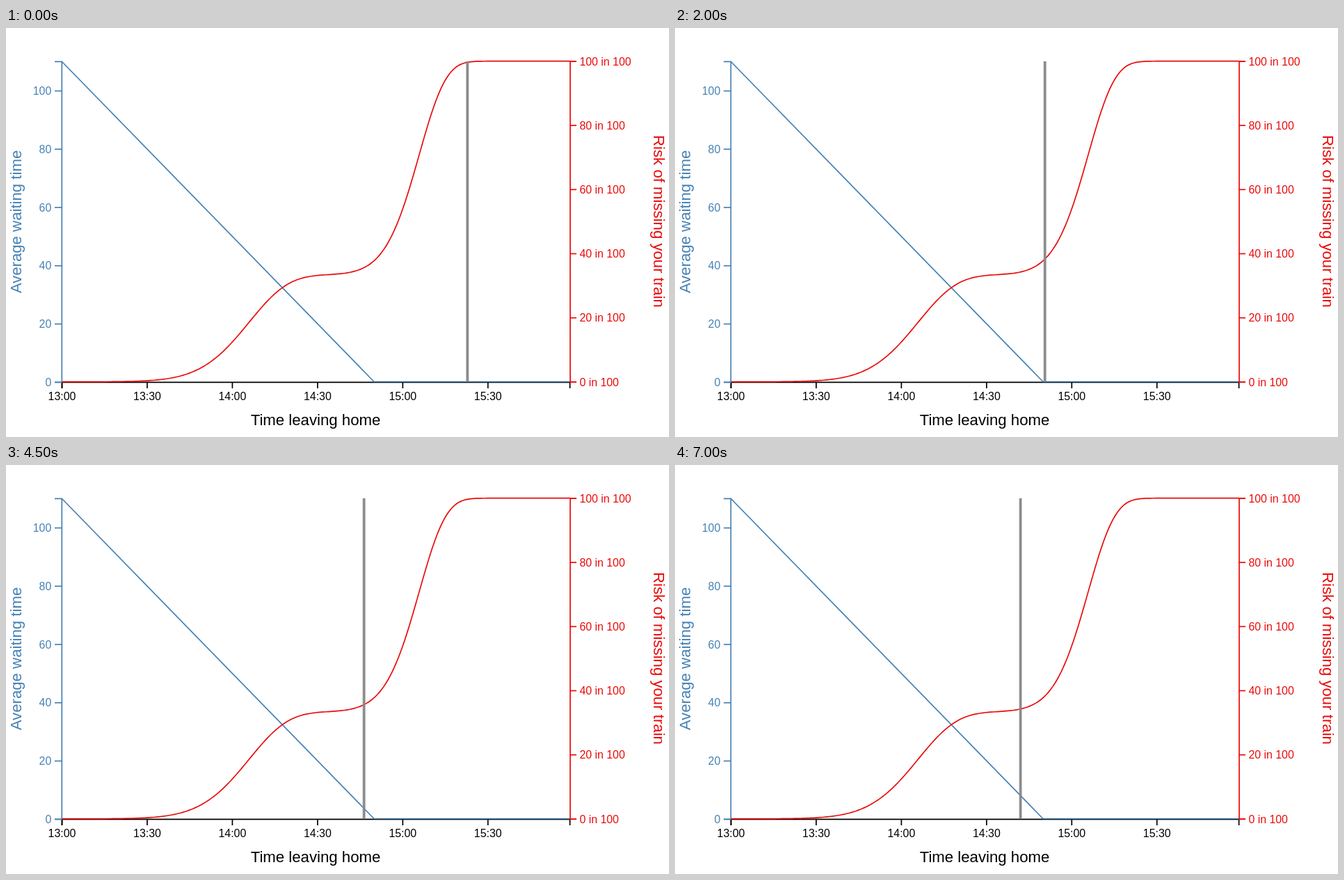
These frames come from a looping animation (953x588 px, 8 s). An HTML page:

```html
<!DOCTYPE html>
<html lang="en">
<head>
<meta charset="utf-8">
<title>Waiting time and risk</title>
<style>
  html, body { margin: 0; width: 100%; height: 100%; overflow: hidden; background: #fff; }
  svg { display: block; width: 953px; height: 588px; font: 15.9px "Liberation Sans", Arial, sans-serif; }
  path { fill: none; stroke-width: 1.7; }
  .title { font-size: 22.2px; text-anchor: middle; }
  .wait path { stroke: #4682b4; }
  .wait text { fill: #4682b4; }
  .wait .label { text-anchor: end; }
  .risk path { stroke: #ea0a0a; }
  .risk text { fill: #ea0a0a; }
  .time path { stroke: #000; }
  .time .label { text-anchor: middle; }
  #bar { fill: #868686; animation: drag 8s step-end infinite; }
  @keyframes drag {
    0% { transform: translateX(663.3px); }
    6.25% { transform: translateX(478px); }
    12.5% { transform: translateX(596.9px); }
    18.75% { transform: translateX(535px); }
    25% { transform: translateX(531.7px); }
    31.25% { transform: translateX(528.7px); }
    37.5% { transform: translateX(527px); }
    43.75% { transform: translateX(473px); }
    50% { transform: translateX(471px); }
    56.25% { transform: translateX(514.6px); }
    68.75% { transform: translateX(517.2px); }
    75% { transform: translateX(524px); }
    81.25% { transform: translateX(520px); }
    87.5%, 100% { transform: translateX(496.6px); }
  }
</style>
</head>
<body>
<svg viewBox="0 0 953 588">
  <g class="time" id="time">
    <path d="M80.5 518V509.3H810.6V518"/>
    <text class="title" x="445" y="571">Time leaving home</text>
  </g>
  <g class="wait" id="wait">
    <path d="M70 48.3H80.3V509.3H70"/>
    <path d="M80.5 48.5L529 508.5H810.6"/>
    <text class="title" transform="translate(22.3 278.5) rotate(-90)">Average waiting time</text>
  </g>
  <g class="risk" id="risk">
    <path d="M820 47.9H811V508.9H820"/>
    <path id="curve"/>
    <text class="title" transform="translate(930.6 278) rotate(90)">Risk of missing your train</text>
  </g>
  <rect id="bar" x="-1.8" y="47.8" width="3.6" height="461"/>
</svg>
<script>
  const LEFT = 80.5, RIGHT = 810.6, BASE = 508.7, HEIGHT = 461;

  function add(parent, tag, attrs, text = '') {
    const el = document.createElementNS('http://www.w3.org/2000/svg', tag);
    for (const key in attrs) el.setAttribute(key, attrs[key]);
    el.textContent = text;
    document.getElementById(parent).append(el);
  }

  function tick(axis, d, x, y, text) {
    add(axis, 'path', { d });
    add(axis, 'text', { class: 'label', x, y }, text);
  }

  ['13:00', '13:30', '14:00', '14:30', '15:00', '15:30'].forEach((text, i) => {
    const x = LEFT + i * 122.45;
    tick('time', `M${x} 509.3V518`, x, 535, text);
  });

  for (let v = 0; v <= 100; v += 20) {
    const yWait = 509.3 - v * 4.188;
    const yRisk = 508.9 - v * 4.61;
    tick('wait', `M70 ${yWait}H80.3`, 65.3, yWait + 5.6, v);
    tick('risk', `M811 ${yRisk}H820`, 824.4, yRisk + 5.6, `${v} in 100`);
  }

  // Cumulative normal distribution
  function phi(z) {
    const t = 1 / (1 + 0.2316419 * Math.abs(z));
    const poly = t * (0.31938153 + t * (-0.356563782 + t * (1.781477937 + t * (-1.821255978 + t * 1.330274429))));
    const tail = Math.exp(-z * z / 2) / Math.sqrt(2 * Math.PI) * poly;
    return z > 0 ? 1 - tail : tail;
  }

  // Chance that a log-normal journey takes longer than the room left
  const late = (x, end, median, spread) =>
    x >= end ? 1 : phi(Math.log(median / (end - x)) / spread);

  const points = [];
  for (let i = 0; i <= 240; i++) {
    const x = LEFT + (RIGHT - LEFT) * i / 240;
    const risk = late(x, 689, 346.8, 0.1465) / 3 + late(x, 820, 231.5, 0.152) * 2 / 3;
    points.push(`${x.toFixed(2)} ${(BASE - HEIGHT * risk).toFixed(2)}`);
  }
  document.getElementById('curve').setAttribute('d', 'M' + points.join('L'));
</script>
</body>
</html>
```
